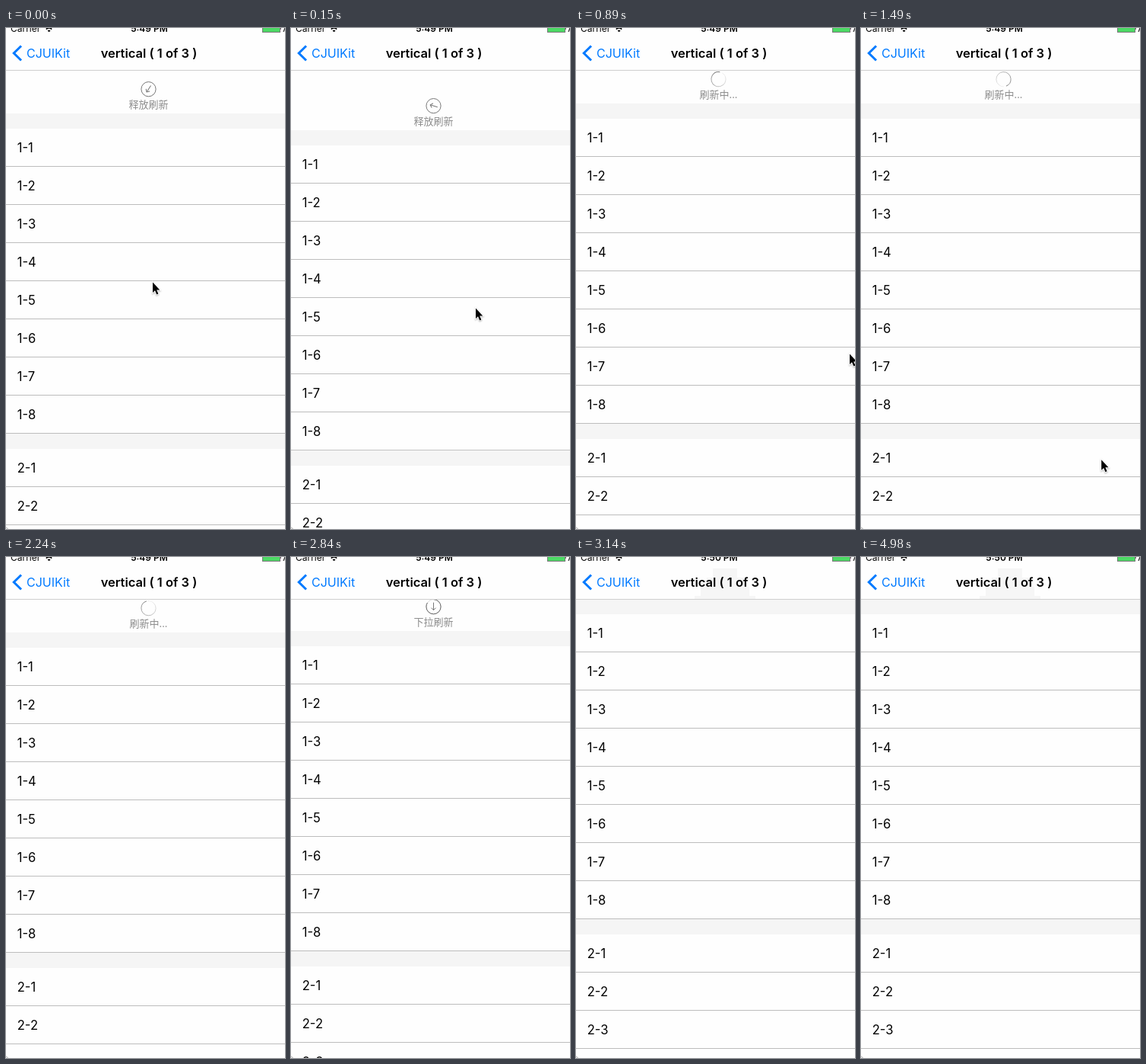
Animation, 367 px wide and 657 px high, one loop 5080 ms. Source, as an HTML page with a canvas:

```html
<!DOCTYPE html>
<html lang="zh">
<head>
<meta charset="utf-8">
<style>
  html, body { margin: 0; width: 100%; height: 100%; overflow: hidden; background: #fefefe; }
  canvas { display: block; }
</style>
</head>
<body>
<canvas id="stage" width="367" height="657"></canvas>
<script>
const ctx = document.getElementById('stage').getContext('2d');
const LOOP = 5080, TICK = 150, RELEASE_TIME = 590;
const RELEASE = 3, DONE = 18, HIDDEN = 20; // in ticks
const WIDTH = 367, NAV = 55, ROW = 50, GAP = 20, CENTER = 187.5;
const UI = 'Inter, "Noto Sans", sans-serif';
const CJK = '"Noto Sans CJK SC", "Noto Sans CJK", sans-serif';
const pointer = new Path2D('M0 0V13.5L3 10.8L5.2 16L7.4 15L5.2 10H9.3Z');

function tickAt(t) {
  return t < RELEASE_TIME
    ? Math.min(RELEASE - 1, Math.floor(t / TICK))
    : RELEASE + Math.floor((t - RELEASE_TIME) / TICK);
}

// Ease-out from a to b while the tick runs from start to end
function ease(tick, start, end, a, b, power = 1) {
  const u = Math.min(1, Math.max(0, (tick - start) / (end - start)));
  return b + (a - b) * (1 - u) ** power;
}

function pullAt(tick) {
  if (tick < RELEASE) return ease(tick, 0, 2, 57, 84.5, 2.3);
  if (tick < DONE) return ease(tick, RELEASE, 5, 84.5, 44, 0.9);
  return ease(tick, DONE, HIDDEN, 42, 0, 1.5);
}

function pointerAt(tick) {
  const move = (start, end, from, to, power) =>
    from.map((value, axis) => ease(tick, start, end, value, to[axis], power));
  const grab = [192, 333], drop = [282, 394], edge = [359, 427], rest = [312, 463], exit = [317, 622];
  if (tick < 3) return move(0, 3, grab, drop, 2);
  if (tick < 5) return move(3, 5, drop, edge, 1);
  if (tick < 8) return move(5, 7, edge, rest, 2);
  return move(8, 10, rest, exit, 1.5);
}

function rect(color, x, y, w, h) {
  ctx.fillStyle = color;
  ctx.fillRect(x, y, w, h);
}

function text(str, x, y, font, color = '#000', align = 'left') {
  ctx.font = font;
  ctx.fillStyle = color;
  ctx.textAlign = align;
  ctx.fillText(str, x, y);
}

function line(points, color, width) {
  ctx.beginPath();
  points.forEach(([x, y]) => ctx.lineTo(x, y));
  ctx.strokeStyle = color;
  ctx.lineWidth = width;
  ctx.stroke();
}

function arc(x, y, r, from, to, color, width) {
  ctx.beginPath();
  ctx.arc(x, y, r, from, to);
  ctx.strokeStyle = color;
  ctx.lineWidth = width;
  ctx.stroke();
}

function drawList(pull) {
  let y = NAV + pull;
  [8, 3].forEach((count, section) => {
    rect('#f5f5f5', 0, y, WIDTH, GAP);
    y += GAP;
    for (let row = 1; row <= count; row++, y += ROW) {
      text(`${section + 1}-${row}`, 14.7, y + 31, `16.6px ${UI}`);
      rect('#bdbdbd', 0, Math.round(y + ROW - 1), WIDTH, 1);
    }
  });
}

function drawArrow(angle) {
  ctx.rotate(angle);
  line([[0, -5.5], [0, 4.5]], '#777', 1);
  line([[-3, 1.5], [0, 4.5], [3, 1.5]], '#777', 1);
}

function drawRefresh(tick, pull) {
  const label = tick < RELEASE ? '释放刷新' : tick < DONE ? '刷新中...' : '下拉刷新';
  text(label, CENTER, pull + 48, `13px ${CJK}`, '#8c8c8c', 'center');

  const top = -Math.PI / 2, turn = Math.PI * 2;
  ctx.save();
  ctx.translate(CENTER, pull + 23.2);
  if (tick < RELEASE) {
    arc(0, 0, 9.6, 0, turn, '#777', 1);
    drawArrow(ease(tick, 0, 2, 0.58, Math.PI));
  } else if (tick < DONE) {
    ctx.rotate((-135 + (tick - RELEASE) * 37) * Math.PI / 180);
    const fade = ctx.createConicGradient(0, 0, 0);
    fade.addColorStop(0, '#f4f4f4');
    fade.addColorStop(0.95, '#777');
    arc(0, 0, 9.6, 0, turn * 0.95, fade, 0.9);
  } else {
    arc(0, 0, 9.6, 0, turn, '#ddd', 1);
    arc(0, 0, 9.6, top, top + turn * pull / 50, '#666', 1);
    drawArrow(0);
  }
  ctx.restore();
}

// The hidden header shows faintly through the translucent bar
function drawHeaderShade() {
  for (let i = 0; i < 4; i++) {
    const half = 16 + 8 * i, y = 15 + 12 * i;
    rect('#f6f6f6', 196 - half, y, 2 * half, NAV - y);
  }
}

function drawBars(hidden) {
  rect('#fefefe', 0, 0, WIDTH, NAV);
  if (hidden) drawHeaderShade();
  rect('#cfcfcf', 0, NAV, WIDTH, 1);

  text('Carrier', 6, 5, `12px ${UI}`);
  arc(56.5, 5, 5, -2.4, -0.74, '#000', 1.6);
  arc(56.5, 5, 1.2, -2.6, -0.5, '#000', 2);
  text(hidden ? '5:50 PM' : '5:49 PM', 188.5, 5, `600 12px ${UI}`, '#000', 'center');
  rect('#777', 337, 0, 24, 6);
  rect('#4cd964', 338, 0, 22, 5);
  rect('#777', 361, 0, 1, 2);
  line([[367, 0], [365, 5]], '#333', 1.3);

  line([[20, 23.5], [10.3, 33], [20, 42.5]], '#007aff', 3);
  text('CJUIKit', 27, 39, `16px ${UI}`, '#007aff');
  text('vertical ( 1 of 3 )', 188, 39, `600 16.5px ${UI}`, '#000', 'center');
}

function drawPointer([x, y]) {
  ctx.save();
  ctx.translate(x + 1, y + 0.5);
  ctx.shadowColor = 'rgba(0,0,0,.3)';
  ctx.shadowBlur = 2;
  ctx.shadowOffsetY = 1;
  ctx.strokeStyle = '#fff';
  ctx.lineWidth = 1.8;
  ctx.stroke(pointer);
  ctx.shadowColor = 'transparent';
  ctx.fillStyle = '#000';
  ctx.fill(pointer);
  ctx.restore();
}

function draw(t) {
  const tick = tickAt(t), pull = pullAt(tick);
  rect('#fefefe', 0, 0, WIDTH, 657);
  drawList(pull);
  drawRefresh(tick, pull);
  drawBars(tick >= HIDDEN);
  line([[0, 654.5], [2.5, 657]], '#999', 1);
  if (tick < 11) drawPointer(pointerAt(tick));
}

const start = performance.now();
function run() {
  draw((performance.now() - start) % LOOP);
  requestAnimationFrame(run);
}
run();
</script>
</body>
</html>
```
